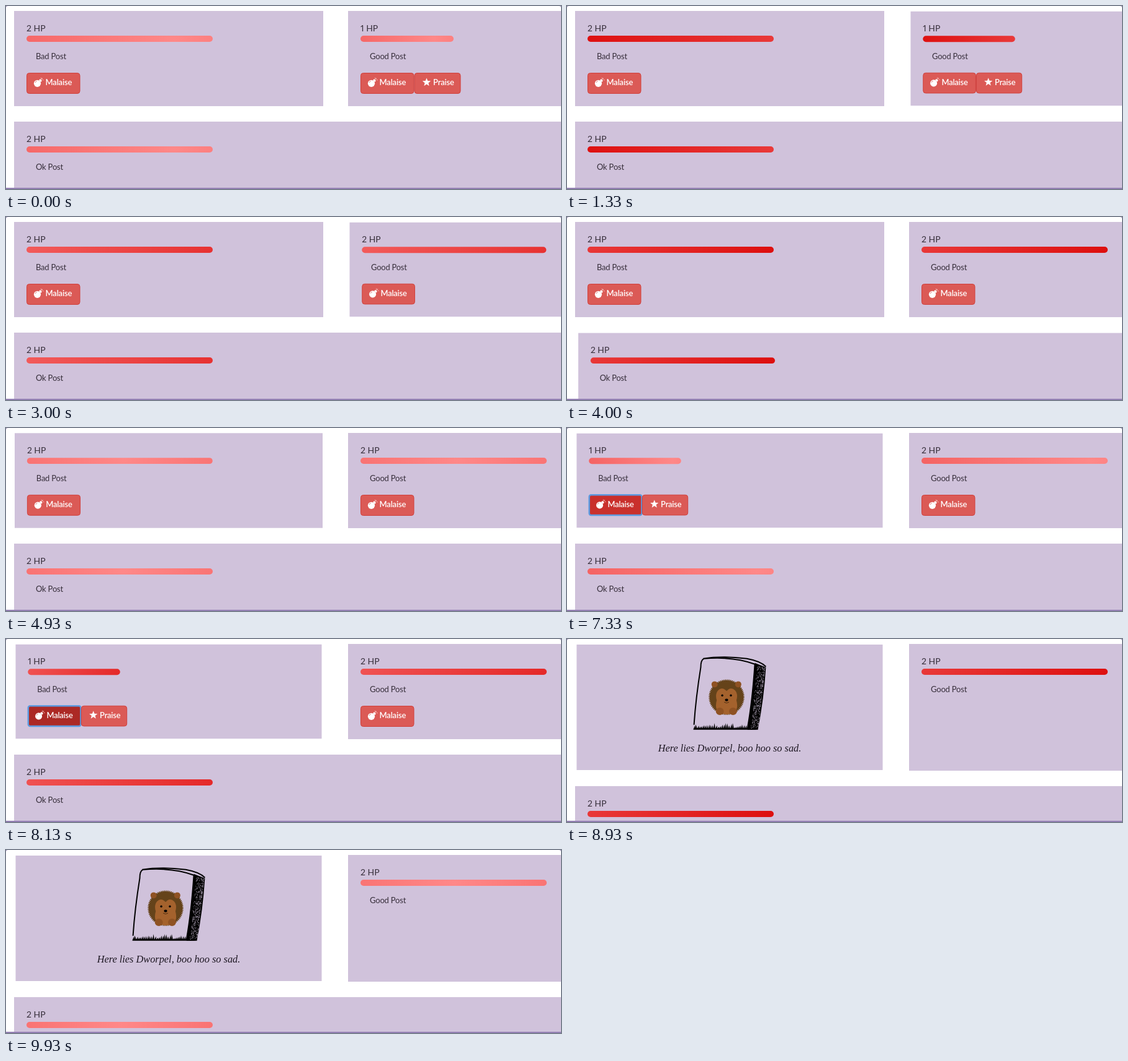
Animation, 894 px wide and 296 px high, one loop 9990 ms. Source, as an HTML page:

```html
<!DOCTYPE html>
<html lang="en">
<head>
<meta charset="utf-8">
<title>Posts</title>
<style>
  html, body { margin: 0; width: 100%; height: 100%; overflow: hidden; background: #fff; }
  svg { display: block; }
  text { font: 13px Lato, sans-serif; letter-spacing: -.2px; fill: #372f3b; }
  .panel { fill: #d0c2db; }
  .hp { font-size: 14px; letter-spacing: 0; font-variant-numeric: proportional-nums; }
  .btn text { font-weight: 600; fill: #fff; }
  .face { fill: #db5a56; stroke: #d03f3b; }
  .hover .face { fill: #c9302c; stroke: #ac2925; }
  .press .face { fill: #ac2925; stroke: #761c19; }
  .ring { fill: none; stroke: #5c9ae0; stroke-width: 2.5; visibility: hidden; }
  .focus .ring { visibility: visible; }
  #epitaph { font: italic 16.5px "Liberation Serif", serif; letter-spacing: 0; fill: #1d1722; }
</style>
</head>
<body>
<svg id="stage" width="894" height="296" viewBox="0 0 894 296">
  <defs>
    <linearGradient id="glow" x1="0" x2="6" y1="0" y2="0">
      <stop offset="0" stop-color="#dd0e0e"/>
      <stop offset=".5" stop-color="#ff8888"/>
      <stop offset="1" stop-color="#dd0e0e"/>
    </linearGradient>
  </defs>
  <g id="cards"></g>
  <path fill="#9581b4" fill-rule="evenodd"
    d="M0 0H894V296H0ZM3 0Q0 0 0 3V294H894V3Q894 0 891 0Z"/>
</svg>
<script>
const LOOP = 9990, STEP = 66.6;
const PRAISED = 2200, HIT = 7300, DEAD = 8200;
const find = (root, selector) => root.querySelector(selector);
const show = (el, on) => el.style.display = on ? '' : 'none';
const between = (t, from, to) => t >= from && t < to;

const bomb = `<circle cx="17.5" cy="17.3" r="5.6" fill="#fff"/>
  <path d="M20 12l3 3 2-2-3-3z" fill="#fff"/>
  <path d="M23.5 12q0-3 2.5-3m-3-1l1 1m2 2l1.5 1" fill="none" stroke="#ffd9d4"/>
  <path d="M14 16q.6-2 2.6-2.4" fill="none" stroke="#db5a56" stroke-width=".8"/>`;
const starPoints = Array.from({ length: 10 }, (_, i) => {
  const r = i % 2 ? 3 : 7, a = i * Math.PI / 5;
  return [20 + r * Math.sin(a), 15.5 - r * Math.cos(a)].map(v => v.toFixed(1));
}).join(' ');
const star = `<polygon points="${starPoints}" fill="#fff"/>`;

const button = (kind, x, y, width, icon, label) =>
  `<g class="btn ${kind}" transform="translate(${x} ${y})">
    <rect class="face" x=".5" y=".5" width="${width - 1}" height="33" rx="4"/>
    <rect class="ring" x=".5" y=".5" width="${width - 1}" height="33" rx="3"/>
    ${icon}<text x="30.5" y="20.3">${label}</text></g>`;

function addCard(x, y, width, height, title) {
  const el = document.createElementNS('http://www.w3.org/2000/svg', 'g');
  el.innerHTML = `<rect class="panel" x="${x}" y="${y}" width="${width}" height="${height}"/>
    <g class="post">
      <text class="hp" x="${x + 20}" y="${y + 33}"></text>
      <rect class="bar" x="${x + 20}" y="${y + 40}" width="300" height="10" rx="5" fill="url(#glow)"/>
      <text x="${x + 35}" y="${y + 78}">${title}</text>
      ${button('malaise', x + 20, y + 100, 86.5, bomb, 'Malaise')}
      ${button('praise', x + 106.5, y + 100, 75, star, 'Praise')}
    </g>`;
  document.getElementById('cards').append(el);
  return { el, x, y, width, height };
}

function tombstone() {
  let seed = 7;
  const random = () => (seed = seed * 16807 % 2147483647) / 2147483647;
  let specks = '', grass = 'M203 146';
  for (let i = 0; i < 420; i++) {
    const u = 1 - random() ** 1.5 * .8, v = random();
    specks += `M${(304 - 11 * v + 15 * u).toFixed(1)} ${(41 + 5 * u + (104 - 5 * u) * v).toFixed(1)}h.8`;
  }
  for (let x = 204; x < 296; x += 3)
    grass += `L${x + 2 * random()} ${136 + 7 * random()}L${x + 2} 145`;
  return `<g class="grave">
    <path d="M303 38L321 45Q318 95 308 147H291Q299 95 303 38Z"/>
    <path d="${specks}" stroke="#d0c2db" stroke-width=".8"/>
    <path d="${grass}L307 147L203 147Z"/>
    <path d="M204 139Q207 95 215 45Q215 33 220 31Q268 27 303 40Q299 100 291 145M219 31Q250 26 290 31Q312 35 321 44" 
      fill="none" stroke="#000" stroke-width="2"/>
    <g fill="#8f5223">
      <circle cx="257" cy="94" r="27.5" fill="#65431a" stroke="#65431a" stroke-width="3" stroke-dasharray="1.6 1.1"/>
      <circle cx="237.5" cy="73" r="5"/><circle cx="276" cy="73" r="5"/>
      <path fill="#a4622d" d="M257 84Q250 76 243 83Q238 89 241 99Q235 121 257 122Q279 121 273 99Q276 89 271 83Q264 76 257 84Z"/>
      <ellipse cx="246" cy="117" rx="6.5" ry="6"/><ellipse cx="267.5" cy="117" rx="6.5" ry="6"/>
    </g>
    <circle cx="250" cy="91" r="1.7"/><circle cx="264" cy="91" r="1.7"/>
    <ellipse cx="257" cy="98.5" rx="2.6" ry="2.2"/>
    <path d="M253 102q4 3 8 0" fill="none" stroke="#4d2c10"/>
    <text id="epitaph" x="262" y="183" text-anchor="middle">Here lies Dworpel, boo hoo so sad.</text></g>`;
}

const bad = addCard(13, 8, 498, 154, 'Bad Post');
const good = addCard(551, 8, 498, 154, 'Good Post');
const ok = addCard(13, 187, 1036, 120, 'Ok Post');
bad.el.insertAdjacentHTML('beforeend', tombstone());
const glow = document.getElementById('glow');

// cubic-bezier(.25, .1, .25, 1)
function ease(p) {
  if (p <= 0 || p >= 1) return p <= 0 ? 0 : 1;
  const curve = (s, a, b) => 3 * a * s * (1 - s) ** 2 + 3 * b * s * s * (1 - s) + s ** 3;
  let low = 0, high = 1;
  for (let i = 0; i < 20; i++) {
    const mid = (low + high) / 2;
    if (curve(mid, .25, .25) < p) low = mid; else high = mid;
  }
  return curve(low, .1, 1);
}

// Hovered cards shrink by one percent around their centre.
function place(card, t, enter, leave, height, dy = 0) {
  const scale = 1 - .01 * (ease((t - enter) / 200) - ease((t - leave) / 200));
  const cx = card.x + card.width / 2, cy = card.y + height / 2;
  find(card.el, '.panel').setAttribute('height', height);
  card.el.setAttribute('transform',
    `translate(${cx} ${cy + dy}) scale(${scale}) translate(${-cx} ${-cy})`);
}

function setPost(card, hp, malaise, praise) {
  find(card.el, '.hp').textContent = hp + ' HP';
  find(card.el, '.bar').setAttribute('width', hp * 150);
  show(find(card.el, '.malaise'), malaise);
  show(find(card.el, '.praise'), praise);
}

function draw(t) {
  const cycle = (t + 3310) % 5000 / 2500;
  const shift = 5 * (cycle < 1 ? ease(cycle) : 1 - ease(cycle - 1));
  glow.setAttribute('gradientTransform', `translate(${-shift} 0)`);

  const dead = t >= DEAD, rowHeight = dead ? 205 : 154;
  place(bad, t, 4880, LOOP, rowHeight);
  place(good, t, 1080, 3300, rowHeight);
  place(ok, t, 3450, 4680, ok.height, dead ? 51 : 0);

  const badHp = t < HIT ? 2 : 1, goodHp = t < PRAISED ? 1 : 2;
  setPost(bad, badHp, true, badHp === 1);
  setPost(good, goodHp, !dead, goodHp === 1);
  setPost(ok, 2, false, false);
  show(find(bad.el, '.post'), !dead);
  show(find(bad.el, '.grave'), dead);

  const malaise = find(bad.el, '.malaise').classList;
  malaise.toggle('hover', t >= 5600);
  malaise.toggle('press', between(t, HIT - 100, HIT) || between(t, DEAD - 120, DEAD));
  malaise.toggle('focus', t >= HIT - 100);
  find(good.el, '.praise').classList.toggle('hover', between(t, 1600, PRAISED));
}

function tick() {
  const t = performance.now() % LOOP;
  draw(Math.floor((t + 5) / STEP) * STEP % LOOP);
  requestAnimationFrame(tick);
}
tick();
</script>
</body>
</html>
```
